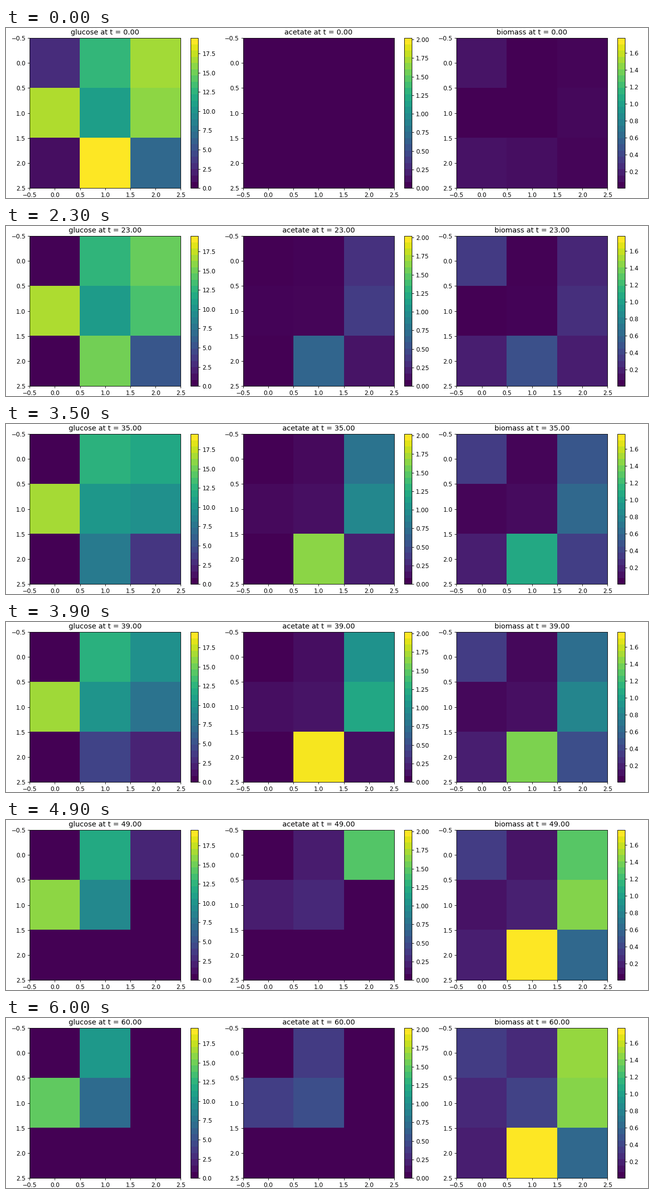
Write a matplotlib script that moves like this. It is 1280 px wide and 341 px high and loops after 6100 ms.

```python
import numpy as np
import matplotlib.pyplot as plt
from matplotlib.animation import FuncAnimation
from matplotlib.cm import ScalarMappable
from matplotlib.colors import Normalize

W, H, DPI = 1280, 341, 256 / 3
FRAMES, INTERVAL = 61, 100
LEFT, TOP, SIDE, PITCH = 47.3, 20.1, 301, 425.55
BAR_OFFSET, BAR_WIDTH, BANDS = 321, 15, 24

# Growth model: biomass eats glucose, spills acetate while glucose is
# plentiful and takes it up again once glucose runs low.
GROWTH = 0.079     # highest growth rate
HALF = 0.6         # glucose level of half the highest rate
YIELD = 0.087      # biomass made per glucose
SPILL = 0.2        # acetate made per glucose
SPILL_FROM = 3.5   # glucose level where spilling turns into uptake
SUBSTEPS = 100

GLUCOSE_START = [[2.5, 12.9, 16.8], [17.2, 10.9, 16.2], [.75, 19.5, 6.6]]
BIOMASS_START = [[.1, .0024, .0336], [.0022, .0041, .0425], [.09, .075, .028]]

# name, low, high, tick step, tick format
PANELS = [
    ("glucose", 0, 19.5, 2.5, "%.1f"),
    ("acetate", 0, 2.02, .25, "%.2f"),
    ("biomass", .006, 1.776, .2, "%.1f"),
]

plt.rcParams["font.family"] = "DejaVu Sans"


def simulate():
    """Return the three grids for every whole t."""
    glucose, biomass = np.array(GLUCOSE_START), np.array(BIOMASS_START)
    acetate = np.zeros((3, 3))
    states = []
    for _ in range(FRAMES):
        states.append((glucose, acetate, biomass))
        for _ in range(SUBSTEPS):
            rate = GROWTH * biomass / (HALF + glucose) / SUBSTEPS
            eaten = rate * glucose / YIELD
            spilt = SPILL * rate * (glucose - SPILL_FROM) / YIELD
            biomass = biomass + YIELD * eaten
            glucose = np.maximum(glucose - eaten, 0)
            acetate = np.maximum(acetate + spilt, 0)
    return states


def add_axes(x, width):
    return fig.add_axes([x / W, 1 - (TOP + SIDE) / H, width / W, SIDE / H])


def add_panel(i, name, low, high, step, fmt):
    left = LEFT + PITCH * i
    norm = Normalize(low, high)
    ax = add_axes(left, SIDE)
    image = ax.imshow(states[0][i], cmap="viridis", norm=norm,
                      aspect="auto", interpolation="nearest")
    ax.set_xticks(np.arange(-.5, 2.6, .5))
    ax.set_yticks(np.arange(-.5, 2.6, .5))

    first = np.ceil(low / step) * step
    fig.colorbar(ScalarMappable(norm, plt.get_cmap("viridis", BANDS)),
                 cax=add_axes(left + BAR_OFFSET, BAR_WIDTH),
                 ticks=np.arange(first, high, step), format=fmt)
    return name, image, ax.set_title("", fontsize=12, pad=6)


def update(t):
    for (name, image, title), grid in zip(views, states[t]):
        image.set_data(grid)
        title.set_text(f"{name} at t = {t:.2f}")
    return [artist for view in views for artist in view[1:]]


states = simulate()
fig = plt.figure(figsize=(W / DPI, H / DPI), dpi=DPI, facecolor="white")
views = [add_panel(i, *panel) for i, panel in enumerate(PANELS)]

anim = FuncAnimation(fig, update, frames=FRAMES, interval=INTERVAL,
                     repeat=True, repeat_delay=0, blit=False)
plt.show()
```
